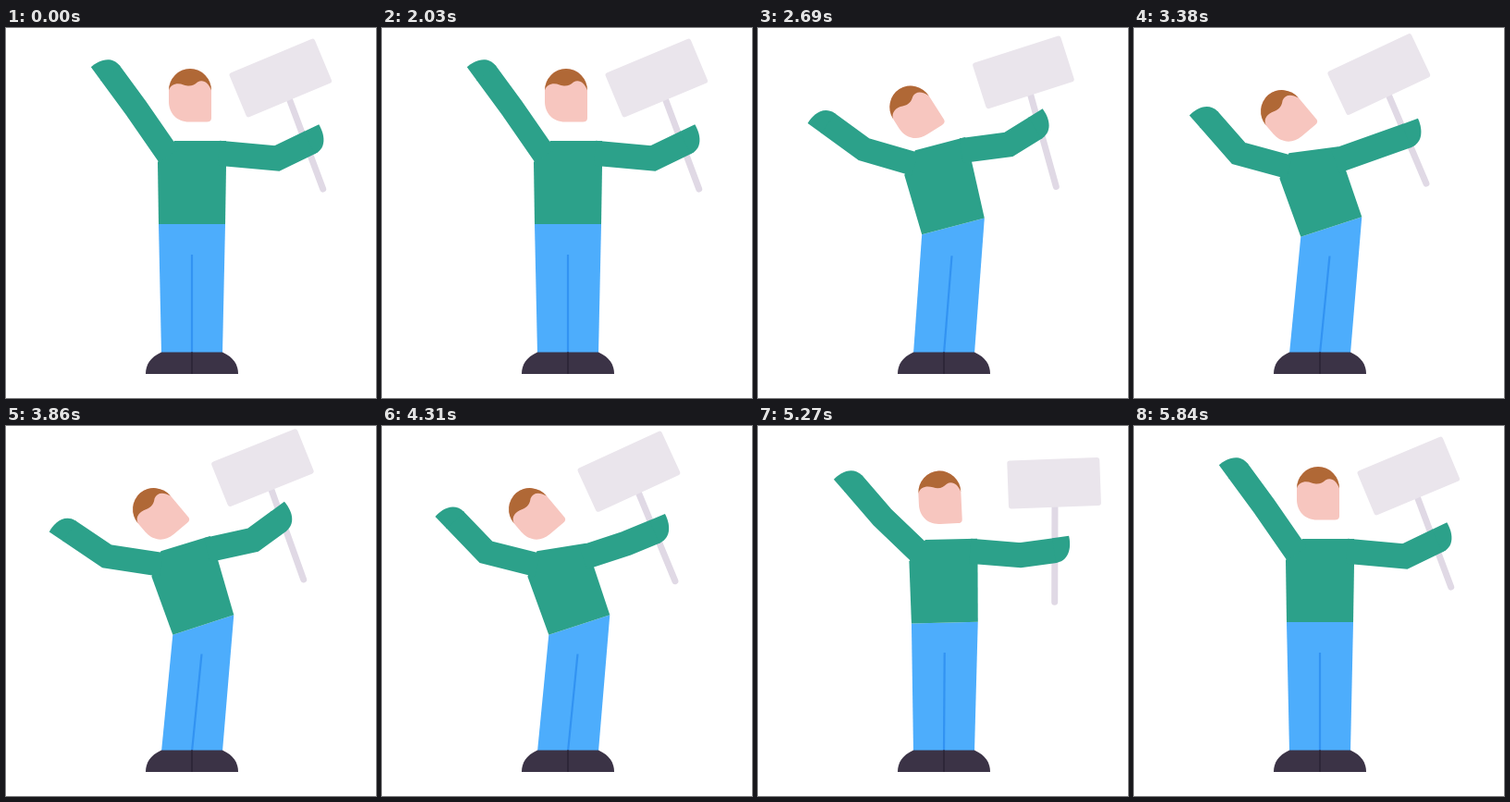
Recreate the animation shown at these times as an HTML page with a canvas. Size 400 by 400 pixels, loop 5870 ms.

```html
<!DOCTYPE html>
<html lang="en">
<head>
<meta charset="utf-8">
<title>Protester</title>
<style>
html, body { margin: 0; width: 100%; height: 100%; overflow: hidden; background: #fff; }
canvas { display: block; width: 400px; height: 400px; }
</style>
</head>
<body>
<canvas id="stage" width="400" height="400"></canvas>
<script>
const ctx = document.getElementById('stage').getContext('2d');
const LOOP = 5870;
const GREEN = '#2ca18a';

// Joints as x, y; the sign adds its angle in degrees.
const leftElbow  = { rest: [140.9, 87], low: [108.5, 141.4], high: [113.5, 135] };
const leftHand   = { rest: [112.4, 48.2], low: [66.5, 115], high: [82, 97.5] };
const rightElbow = { rest: [293, 141], swing: [285, 141], low: [267.5, 122.5], high: [263.5, 128] };
const rightHand  = { rest: [328.8, 123.7], swing: [323, 137], low: [295, 101], high: [295.5, 117.5] };
const sign       = { rest: [296.8, 54, -22.7], swing: [335, 68, 5], low: [279, 44.5, -21.5], high: [263.7, 50.5, -25.5] };

const rad = degrees => degrees * Math.PI / 180;
const mix = (a, b, k) => a.map((v, i) => v + (b[i] - v) * k);

function ease(t, start, end) {
  const u = Math.min(1, Math.max(0, (t - start) / (end - start)));
  return u * u * (3 - 2 * u);
}

// Rises from 0 to 1, holds, and falls back.
const pulse = (t, a, b, c, d) => ease(t, a, b) - ease(t, c, d);

// Swing out first, then lean in, then wave between low and high.
function place(joint, swing, lean, wave) {
  const upright = mix(joint.rest, joint.swing || joint.rest, swing);
  return mix(upright, mix(joint.low, joint.high, wave), lean);
}

function fill(path, color) {
  ctx.fillStyle = color;
  ctx.fill(new Path2D(path));
}

function polygon(points, color) {
  fill('M' + points.join('L') + 'Z', color);
}

function line(points, width, color, cap = 'butt') {
  ctx.lineWidth = width;
  ctx.lineCap = cap;
  ctx.strokeStyle = color;
  ctx.stroke(new Path2D('M' + points.join('L')));
}

function at(x, y, degrees, draw) {
  ctx.save();
  ctx.translate(x, y);
  ctx.rotate(rad(degrees));
  draw();
  ctx.restore();
}

function arm(shoulder, elbow, hand, width) {
  const reach = Math.hypot(shoulder[0] - elbow[0], shoulder[1] - elbow[1]);
  const inside = mix(elbow, shoulder, 1 + 6 / reach); // tuck the sleeve under the torso
  line([inside, elbow, hand], width, GREEN);
  const angle = Math.atan2(hand[1] - elbow[1], hand[0] - elbow[0]) * 180 / Math.PI;
  at(...hand, angle, () => {
    const h = width / 2;
    fill(`M-1 ${-h}H17C18 -3 15 ${h - 1} 0 ${h}H-1Z`, GREEN);
  });
}

function drawSign() {
  line([[0, 24], [-4, 128.5]], 7, '#e0d9e5', 'round');
  ctx.fillStyle = '#eae5ec';
  ctx.beginPath();
  ctx.roundRect(-50, -26, 100, 52, 3);
  ctx.fill();
}

function drawHead() {
  fill('M-23 -5A23 23.5 0 0 1 23 -5V25Q23 29 18 29H-1C-15 29 -23 19 -23 7Z', '#f7c6bf');
  fill('M-23 -5C-21 -12.5 -13 -13.5 -7 -11C0 -8.5 4 -10.5 8 -14C14 -17.5 20 -13.5 23 -5A23 23.5 0 0 0 -23 -5Z', '#b06836');
}

function draw(t) {
  const lead = pulse(t, 2250, 2820, 4960, 5330);
  const lean = pulse(t, 2250, 2860, 4960, 5330);
  const lag = pulse(t, 2250, 2860, 4960, 5400);
  const swing = pulse(t, 2030, 2340, 5470, 5840);
  const carry = pulse(t, 2340, 2800, 4960, 5430);
  const wavePhase = Math.min(1, Math.max(0, (t - 2970) / 1990));
  const wave = (1 - Math.cos(wavePhase * 4 * Math.PI)) / 2;
  const drop = 11 * wave;

  const tilt = rad(-18 * lean), cos = Math.cos(tilt), sin = Math.sin(tilt);
  const hipX = 201 + 12.3 * lean, hipY = 212 + 3 * lag;
  const body = (x, y, sag = 0) => [hipX + x * cos - y * sin, hipY + x * sin + y * cos + sag];
  const half = 36 - 1.3 * lean;
  const hips = [body(-half, 0), body(half, 0)];

  ctx.clearRect(0, 0, 400, 400);
  at(...place(sign, swing, carry, wave), drawSign);

  polygon([...hips, [234, 352], [168, 352]], '#4dadfc');
  line([[201 + 10.5 * lean, 245 + 1.5 * lean], [201, 352]], 2.2, '#3293f2');
  fill('M151 374C151 364 156 356 168 350.5H234C246 356 251 364 251 374Z', '#3b3346');
  line([[201, 350.5], [201, 374]], 2, '#2d2638');

  polygon([...hips, body(37, -62, drop), body(37, -90, drop), body(-19, -90), body(-37, -67)], GREEN);
  arm(body(-28, -78.5), place(leftElbow, swing, lag, wave), place(leftHand, swing, lag, wave), 26);
  arm(body(35, -76.2, drop), place(rightElbow, swing, lean, wave), place(rightHand, swing, lean, wave), 27);

  at(199 - 35.5 * lead, 72.5 + 21.7 * lag, -40 * lean, drawHead);
}

function frame(now) {
  draw(now % LOOP);
  requestAnimationFrame(frame);
}
requestAnimationFrame(frame);
</script>
</body>
</html>
```
